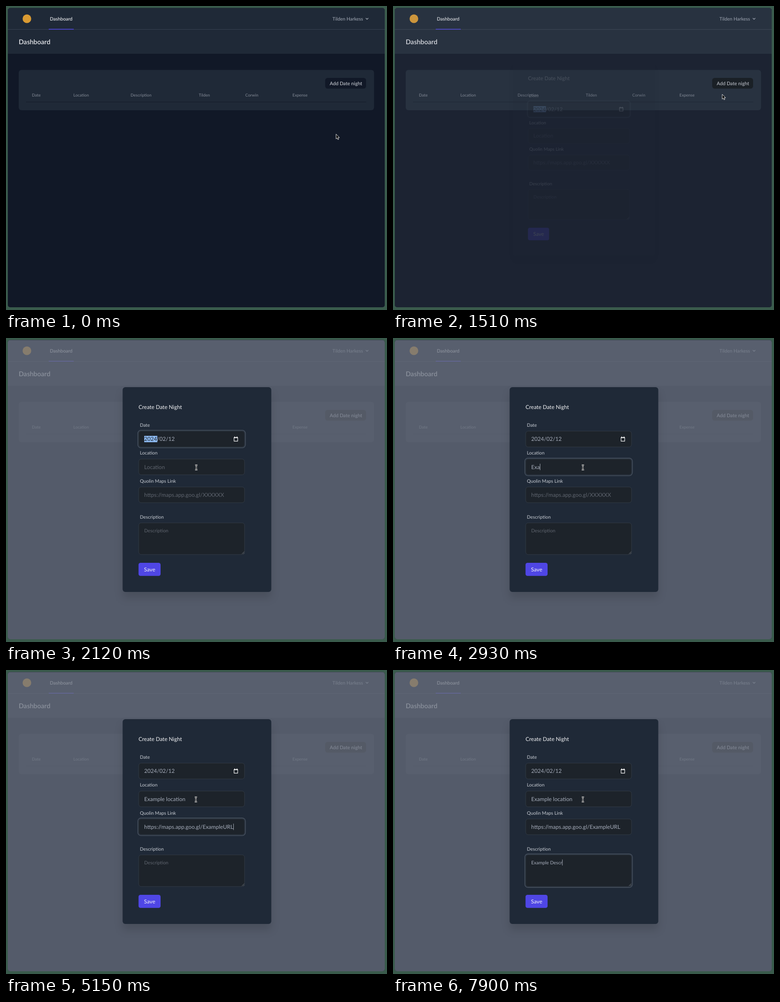
Animation, 838 px wide and 668 px high, one loop 7.99 s. Source, as an HTML page:

```html
<!DOCTYPE html>
<html lang="en">
<head>
<meta charset="utf-8">
<title>Dashboard</title>
<style>
  html, body { margin: 0; width: 100%; height: 100%; overflow: hidden; background: #3a5b4c; }
  svg { display: block; width: 100vw; height: 100vh; }
  text { font-family: Lato, "Open Sans", sans-serif; white-space: pre; text-rendering: geometricPrecision; }
  .nav { font-size: 10.4px; font-weight: 500; }
  .title { font-size: 14.5px; font-weight: 600; fill: #e5e7eb; }
  .th { font-size: 9px; font-weight: 500; fill: #7d8490; }
  .add { font-size: 10.7px; font-weight: 500; fill: #c6cad1; }
  .heading { font-size: 12px; fill: #f3f4f6; }
  .label { font-size: 10.3px; fill: #c8cdd4; }
  .field { fill: #1d232a; stroke: #38404b; stroke-width: .8; }
  .ring { fill: none; stroke: #4a5461; stroke-width: 1.4; }
  .value { font-size: 12.1px; fill: #a6adbb; }
  .value.small { font-size: 10.45px; }
  .value.empty { fill: #5f656f; }
  #panel { filter: drop-shadow(0 13px 9px rgba(0, 0, 0, .13)); }
</style>
</head>
<body>
<svg viewBox="0 0 838 668" preserveAspectRatio="none">
  <defs>
    <clipPath id="window"><rect x="4" y="4.5" width="829" height="657.5" rx="5"/></clipPath>
  </defs>
  <rect width="838" height="668" fill="#3a5b4c"/>
  <g clip-path="url(#window)">
    <rect x="4" y="4" width="829" height="658" fill="#111827"/>
    <rect x="4" y="4" width="829" height="101" fill="#1f2937"/>
    <rect x="4" y="51" width="829" height="1" fill="#374151"/>
    <circle cx="46" cy="28" r="9.5" fill="#d99a32"/>
    <text class="nav" x="96.5" y="32.3" fill="#f3f4f6">Dashboard</text>
    <rect x="94" y="50.3" width="55" height="1.5" fill="#5348e8"/>
    <text class="nav" x="718" y="31.6" fill="#9ca3af">Tilden Harkess</text>
    <path d="M791.3 26.4l2.8 2.8 2.8-2.8" fill="none" stroke="#9ca3af" stroke-width="1.4"/>
    <text class="title" x="28" y="83.7">Dashboard</text>

    <rect x="28" y="140.5" width="781.5" height="88.5" rx="6" fill="#1f2937"/>
    <rect id="add" x="702" y="158" width="90" height="23.5" rx="5.5"/>
    <text class="add" x="712" y="173.6">Add Date night</text>
    <g id="columns"></g>
    <rect x="44" y="210.5" width="748" height="1" fill="#141c2a"/>

    <rect id="shade" x="4" y="4" width="829" height="658" fill="#6b7280"/>
  </g>

  <g id="modal">
    <rect id="panel" x="256.5" y="108" width="327" height="450" rx="6" fill="#1f2937"/>
    <text class="heading" x="291.5" y="155.8">Create Date Night</text>
    <g id="fields"></g>
    <rect id="mark" x="304" y="215" width="28.8" height="14" fill="#8dbaf2"/>
    <text class="value" x="304" y="226.2"><tspan id="year">2024</tspan>/02/12</text>
    <path d="M501.6 218.6h8v8h-8z" fill="none" stroke="#fff" stroke-width="1.1"/>
    <path d="M501.2 219h8.8M503.2 218v-1.4M508 218v-1.4" fill="none" stroke="#fff" stroke-width="1.5"/>
    <text class="value" id="location" x="304" y="287.6"></text>
    <text class="value" id="link" x="304" y="349"></text>
    <text class="value small" id="description" x="304" y="426.6"></text>
    <path d="M519 474.5l5-5M522 474.5l2-2" stroke="#9aa0a8" stroke-width=".7"/>
    <rect id="ring" class="ring" x="289.9" width="236.7" rx="7"/>
    <rect id="caret" width=".9" fill="#b4bac6"/>
    <rect x="291.5" y="494" width="48.5" height="28.8" rx="4.3" fill="#4f46e5"/>
    <text class="heading" x="303.6" y="512.6">Save</text>
  </g>

  <g id="cursor">
    <path id="arrow" d="M0 0V10.6L2.4 8.4 4 12.1 5.8 11.3 4.2 7.7H7.4Z" fill="#000" stroke="#fff" stroke-width=".9"/>
    <path id="hand" d="M-1 6V.8Q0-.5 1 .8V4l4 1.1q1.3.4 1.1 1.7L5.4 11.4H.2L-3 7.4q.5-1.5 2 0z" fill="#fff" stroke="#000" stroke-width=".7"/>
    <g id="beam" fill="none">
      <path id="beamEdge" stroke="#fff" stroke-width="2.5"/>
      <path id="beamCore" stroke="#000" stroke-width=".9"/>
    </g>
  </g>
</svg>
<script>
  const LOOP = 7990, HOLD = 87.7, FIRST = 540, OPEN = 1491;
  const LOCATION = 'Example location';
  const LINK = 'https://maps.app.goo.gl/ExampleURL';
  const DESCRIPTION = 'Example Descr';

  const $ = id => document.getElementById(id);
  const show = (node, on) => node.setAttribute('visibility', on ? 'inherit' : 'hidden');
  const run = (start, count) => Array.from({ length: count }, (_, i) => start + i * 87);

  const locationKeys = [2660, ...run(2840, 3), 3290, 3380, 3380, 3560, ...run(3740, 8)];
  const descriptionKeys = [...run(6040, 4), ...run(6480, 3), 6830, 7370, 7550, 7720, 7720, 7900];
  const caretGaps = [[4980, 5150], [5870, 6040], [7280, 7370]];

  // label, label baseline, box top, box height, focus time
  const fields = [
    ['Date', 194.8, 204.6, 34.8, 0],
    ['Location', 256.4, 266, 34.6, 2210],
    ['Quolin Maps Link', 317.7, 327.3, 34.6, 4530],
    ['Description', 396.7, 406.2, 69.6, 5330],
  ];
  const columns = [['Date', 57], ['Location', 148.3], ['Description', 274], ['Tilden', 424], ['Corwin', 526.3], ['Expense', 630]];

  // time, x, y
  const path = [
    [0, 726, 281.5], [452, 726, 281.5], [540, 729, 273], [628, 742, 240], [715, 760, 202],
    [803, 771, 183], [891, 773, 177.6], [1154, 773, 177.6], [1330, 767, 179], [1417, 752, 185],
    [1505, 724, 194], [1592, 621, 230], [1680, 532, 259], [1768, 468, 275], [1856, 433, 282],
    [2031, 418.5, 284.3], [2119, 418.5, 284.3], [2206, 417.6, 284.3],
  ];

  $('columns').innerHTML = columns.map(([name, x]) => `<text class="th" x="${x}" y="199">${name}</text>`).join('');
  $('fields').innerHTML = fields.map(([name, base, top, height]) =>
    `<text class="label" x="294.5" y="${base}">${name}</text>
     <rect class="field" x="291.9" y="${top}" width="232.8" height="${height}" rx="5.5"/>`).join('');
  const beam = 'M-2.6-5.4Q0-5.4 0-3.8Q0-5.4 2.6-5.4M0-3.8V3.8M-2.6 5.4Q0 5.4 0 3.8Q0 5.4 2.6 5.4M-1.5.8H1.5';
  $('beamEdge').setAttribute('d', beam);
  $('beamCore').setAttribute('d', beam);

  // cubic-bezier(0, 0, .2, 1)
  function easeOut(x) {
    if (x <= 0) return 0;
    if (x >= 1) return 1;
    let lo = 0, hi = 1;
    for (let i = 0; i < 24; i++) {
      const s = (lo + hi) / 2;
      if (.6 * s * s + .4 * s ** 3 < x) lo = s; else hi = s;
    }
    return 3 * lo * lo - 2 * lo ** 3;
  }

  function cursorAt(t) {
    const next = path.findIndex(key => key[0] > t);
    if (next < 0) return path[path.length - 1].slice(1);
    const [t0, x0, y0] = path[next - 1], [t1, x1, y1] = path[next];
    const k = (t - t0) / (t1 - t0);
    return [x0 + (x1 - x0) * k, y0 + (y1 - y0) * k];
  }

  const typed = (text, keys, t) => text.slice(0, keys.filter(key => t >= key).length);

  function setValue(id, value, placeholder) {
    const node = $(id), content = value || placeholder;
    if (node.textContent !== content) node.textContent = content;
    node.classList.toggle('empty', !value);
    return value ? node.getComputedTextLength() : 0;
  }

  function drawModal(t, p) {
    const scale = .95 + .05 * p;
    $('shade').setAttribute('opacity', .75 * p);
    $('modal').setAttribute('opacity', p);
    $('modal').setAttribute('transform', `translate(420 333) scale(${scale}) translate(-420 -333)`);
    show($('modal'), p > 0);

    const focus = fields.filter(field => t >= field[4]).length - 1;
    const [, , top, height] = fields[focus];
    $('ring').setAttribute('y', top - 2);
    $('ring').setAttribute('height', height + 4);
    show($('mark'), focus === 0);
    $('year').setAttribute('fill', focus === 0 ? '#1d232a' : '#a6adbb');

    const widths = [
      0,
      setValue('location', typed(LOCATION, locationKeys, t), 'Location'),
      setValue('link', t >= 5150 ? LINK : '', 'https://maps.app.goo.gl/XXXXXX'),
      setValue('description', typed(DESCRIPTION, descriptionKeys, t), 'Description'),
    ];
    $('caret').setAttribute('x', 304 + widths[focus]);
    $('caret').setAttribute('y', top + 10.3);
    $('caret').setAttribute('height', focus === 3 ? 13 : 14);
    show($('caret'), focus > 0 && !caretGaps.some(([a, b]) => t >= a && t < b));
  }

  function drawCursor(held) {
    const [x, y] = cursorAt(held);
    const onButton = x > 702 && x < 792 && y < 181.5 && held < OPEN;
    const onField = x < 525 && y > 265;
    $('cursor').setAttribute('transform', `translate(${x} ${y})`);
    show($('hand'), onButton);
    show($('beam'), onField);
    show($('arrow'), !onButton && !onField);
  }

  function render(t) {
    const held = t < FIRST ? 0 : FIRST + Math.floor((t - FIRST + 4) / HOLD) * HOLD;
    $('add').setAttribute('fill', t < 1340 ? '#111827' : '#0f1419');
    drawModal(t, easeOut((held - OPEN) / 300));
    drawCursor(held);
  }

  const start = performance.now();
  function tick() {
    render((performance.now() - start) % LOOP);
    requestAnimationFrame(tick);
  }
  tick();
</script>
</body>
</html>
```
